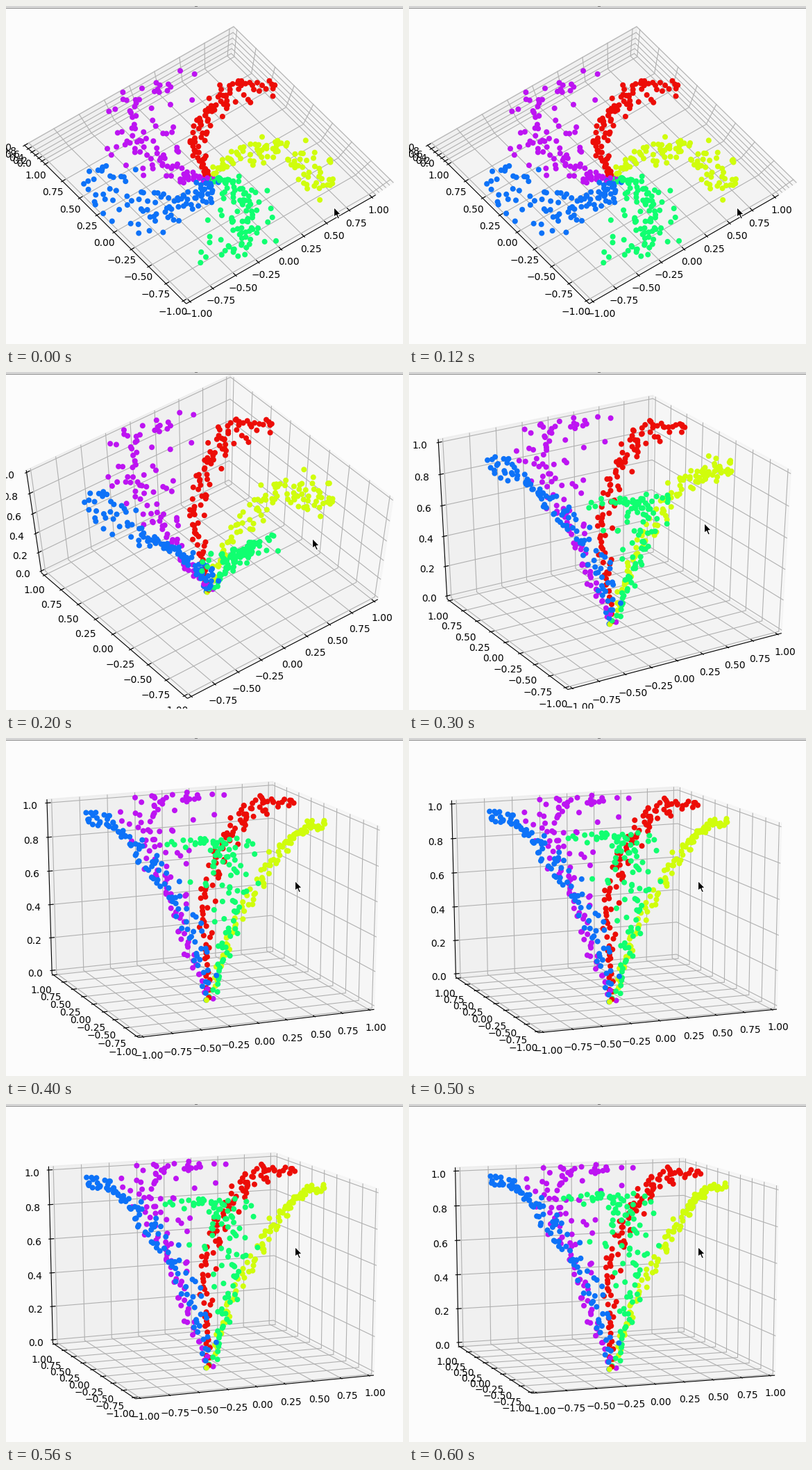
These frames come from a looping animation (572 px wide and 486 px high, 0.7 s). A matplotlib script:

```python
import numpy as np
import matplotlib.pyplot as plt
from matplotlib.animation import FuncAnimation
from matplotlib.colors import to_rgb
from matplotlib.patches import Polygon, Rectangle

WIDTH, HEIGHT, DPI = 572, 486, 100
BACKGROUND = "#fcfcfc"
ARM_COLORS = ["#ec0d07", "#d0fd0c", "#10ff70", "#0d72f8", "#bd14f2"]
CENTER = np.array([292.3, 237.7])
SCALE = np.array([640, -480]) / 1.85
DISTANCE = 10
HALF = 0.5 + 1 / 48          # panes lie slightly outside the unit cube
PAD = HALF + 0.057           # where tick labels sit
TICK_OUT, TICK_IN = 0.1 / 12, 0.2 / 12

# elevation, azimuth, cursor tip
VIEWS = [
    (85.6, -127.3, (472.5, 289.5)),
    (57.2, -128.0, (441.5, 239.5)),
    (30.9, -121.1, (425.5, 217.5)),
    (18.2, -112.7, (416.5, 205.5)),
    (15.2, -111.8, (416.5, 205.5)),
    (12.2, -109.6, (416.5, 205.5)),
]
SCHEDULE = [0, 0, 1, 2, 3, 4, 5]
CURSOR = np.array([(0, 0), (0, 14), (3.2, 11.2), (5.6, 16.6),
                   (8, 15.6), (5.6, 10.4), (10, 10.2)])


def make_spirals(count=100):
    rng = np.random.default_rng(4)
    r = np.linspace(0, 1, count) ** 0.8
    points, colors = [], []
    for k, color in enumerate(ARM_COLORS):
        noise = rng.normal(0, 0.1 + 0.06 * k, count)
        t = 2 * np.pi * k / len(ARM_COLORS) + (1.15 + 0.05 * k) * r + noise
        z = 1.07 * np.sin(np.pi * r / 2) - 0.07
        arm = np.column_stack([r * np.sin(t) / 2, r * np.cos(t) / 2, z - 0.5])
        points.append(arm + rng.normal(0, 0.01, arm.shape))
        colors.append(np.tile(to_rgb(color), (count, 1)))
    return np.vstack(points), np.vstack(colors)


def make_projector(elev, azim):
    e, a = np.radians([elev, azim])
    right = np.array([-np.sin(a), np.cos(a), 0])
    up = np.array([-np.sin(e) * np.cos(a), -np.sin(e) * np.sin(a), np.cos(e)])
    toward = np.array([np.cos(e) * np.cos(a), np.cos(e) * np.sin(a), np.sin(e)])

    def project(points):
        points = np.asarray(points, float)
        depth = points @ toward
        flat = np.stack([points @ right, points @ up], axis=-1)
        factor = DISTANCE / (DISTANCE - depth)
        return CENTER + SCALE * flat * factor[..., None], depth

    return project


POINTS, COLORS = make_spirals()
XY_TICKS = np.linspace(-1, 1, 9)
Z_TICKS = np.linspace(0, 1, 6)

fig = plt.figure(figsize=(WIDTH / DPI, HEIGHT / DPI), dpi=DPI,
                 facecolor=BACKGROUND)
ax = fig.add_axes([0, 0, 1, 1])


def draw_line(project, points, color, zorder):
    xy, _ = project(points)
    ax.plot(xy[:, 0], xy[:, 1], color=color, lw=0.8, zorder=zorder,
            solid_capstyle="butt")


def draw_panes(project):
    h = HALF
    square = [(-h, -h), (h, -h), (h, h), (-h, h)]
    panes = [([(h, p, q) for p, q in square], 0.95),
             ([(p, h, q) for p, q in square], 0.90),
             ([(p, q, -h) for p, q in square], 0.925)]
    for corners, gray in panes:
        ax.add_patch(Polygon(project(corners)[0], lw=1, zorder=1,
                             color=(gray, gray, gray, 0.5)))


def draw_tick(project, edge, direction, label_at, text):
    edge = np.array(edge, float)
    step = np.zeros(3)
    step[direction] = 1
    draw_line(project, [edge - TICK_OUT * step, edge + TICK_IN * step],
              "black", 4)
    (x, y), _ = project(label_at)
    ax.text(x, y, text.replace("-", "\u2212"), fontsize=10, ha="center",
            va="top", family="DejaVu Sans", zorder=6)


def draw_axes(project):
    h = HALF
    for value in XY_TICKS:
        p, text = value / 2, f"{value:.2f}"
        draw_line(project, [(p, -h, -h), (p, h, -h), (p, h, h)], "#b0b0b0", 2)
        draw_line(project, [(-h, p, -h), (h, p, -h), (h, p, h)], "#b0b0b0", 2)
        draw_tick(project, (p, -h, -h), 1, (p, -PAD, -PAD), text)
        draw_tick(project, (-h, p, -h), 0, (-PAD, p, -PAD), text)
    for value in Z_TICKS:
        p = value - 0.5
        draw_line(project, [(h, -h, p), (h, h, p), (-h, h, p)], "#b0b0b0", 2)
        draw_tick(project, (-h, h, p), 0, (-PAD, PAD, p), f"{value:.1f}")
    for ends in ([(-h, -h, -h), (h, -h, -h)],
                 [(-h, -h, -h), (-h, h, -h)],
                 [(-h, h, -h), (-h, h, h)]):
        draw_line(project, ends, "black", 3)


def draw_points(project):
    xy, depth = project(POINTS)
    order = np.argsort(depth)
    ax.scatter(xy[order, 0], xy[order, 1], s=18, c=COLORS[order], lw=1.5,
               edgecolors="face", zorder=5)


def draw_window(tip):
    def strip(x, y, w, h, color):
        ax.add_patch(Rectangle((x, y), w, h, fc=color, ec="none", zorder=8))

    strip(0, 484, WIDTH, 2, BACKGROUND)
    strip(0, 0, WIDTH, 3, "#d4d4d4")
    strip(0, 3, WIDTH, 1, "#989898")
    strip(272, 0, 4, 1, "#777777")
    ax.add_patch(Polygon(CURSOR + tip, fc="black", ec="white", lw=0.8,
                         zorder=9))


def draw(i):
    elev, azim, tip = VIEWS[SCHEDULE[i]]
    project = make_projector(elev, azim)
    ax.clear()
    ax.set(xlim=(0, WIDTH), ylim=(HEIGHT, 0), autoscale_on=False)
    ax.axis("off")
    draw_panes(project)
    draw_axes(project)
    draw_points(project)
    draw_window(tip)
    return []


animation = FuncAnimation(fig, draw, frames=len(SCHEDULE), interval=100,
                          repeat=True, repeat_delay=0)
plt.show()
```
